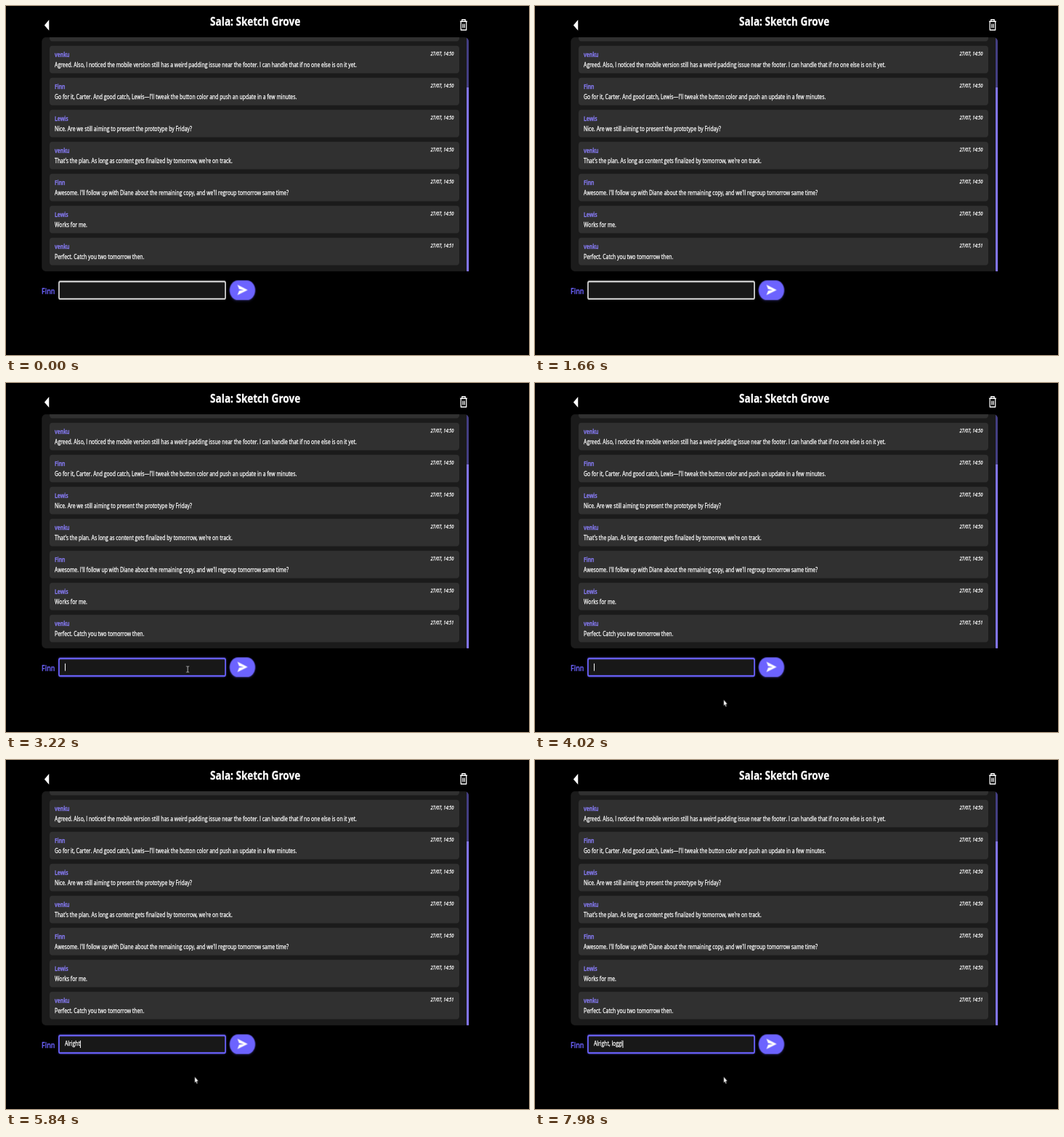
An HTML page for the animation above (8 s loop, 720x480 px).

```html
<!DOCTYPE html>
<html lang="en">
<head>
<meta charset="utf-8">
<title>Chat room</title>
<style>
  html, body { margin: 0; width: 100%; height: 100%; overflow: hidden; background: #000; }
  svg { display: block; width: 720px; height: 480px; }
  text { font: 18.25px "Open Sans", "Noto Sans", sans-serif; fill: #fff; stroke: #fff; stroke-width: .6; white-space: pre; }
  .title { font-size: 36.3px; font-weight: 700; text-anchor: middle; }
  .author { font-size: 18.4px; font-weight: 600; fill: #8b7fff; stroke: #8b7fff; }
  .time { font-size: 15.5px; font-style: italic; text-anchor: end; }
  .me { font-size: 23.4px; font-weight: 600; fill: #6c63ff; stroke: #6c63ff; }
  .card { fill: #303030; }
  .send { fill: #6c63ff; filter: drop-shadow(0 3px 4px #6c63ff40); }

  .field { fill: #181818; stroke: #d6d6d6; stroke-width: 4.6; animation: focus 8s step-end infinite; }
  @keyframes focus {
    0% { stroke: #d6d6d6; filter: none; }
    35.6%, 100% { stroke: #6c63ff; filter: drop-shadow(0 0 4px #6c63ff60); }
  }

  #pointer { animation: move 8s ease-in-out infinite; }
  @keyframes move {
    0%, 21.25% { transform: translate(800px, 1110px); }
    31% { transform: translate(685px, 904px); }
    34.4%, 43.75% { transform: translate(667px, 886px); }
    49.4%, 100% { transform: translate(693px, 980px); }
  }
  .arrow { animation: outside 8s step-end infinite; }
  .beam { animation: inside 8s step-end infinite; }
  @keyframes outside { 0% { opacity: 1; } 30% { opacity: 0; } 45.8%, 100% { opacity: 1; } }
  @keyframes inside { 0% { opacity: 0; } 30% { opacity: 1; } 45.8%, 100% { opacity: 0; } }
</style>
</head>
<body>
<svg viewBox="0 0 1920 1080" preserveAspectRatio="none">
  <clipPath id="panelClip"><rect x="131" y="97" width="1568" height="724" rx="14"/></clipPath>

  <path d="M158 43V76L141 59.5Z" fill="#fff"/>
  <text class="title" x="915" y="60.5">Sala: Sketch Grove</text>
  <path d="M1667 48H1693M1674 47V42H1686V47M1670 49V74H1690V49M1677 55V68M1683 55V68"
    fill="none" stroke="#fff" stroke-width="3.4" stroke-linejoin="round"/>

  <g clip-path="url(#panelClip)">
    <rect x="131" y="97" width="1568" height="724" fill="#1b1b1b"/>
    <g id="messages"><rect class="card" x="160" y="24" width="1504" height="85" rx="10"/></g>
    <rect x="1691" y="97" width="8" height="155" fill="#453f86"/>
  </g>
  <rect x="1691" y="252" width="8" height="569" fill="#8577f2"/>

  <text class="me" x="131" y="891">Finn</text>
  <rect class="field" x="194.5" y="852.5" width="611" height="54" rx="5"/>
  <text id="draft" x="216" y="885"></text>
  <rect id="caret" y="868" width="2.6" height="23" fill="#fff"/>

  <rect class="send" x="821" y="849" width="94" height="61" rx="30.5"/>
  <path d="M2 3L23 12L2 21L5.5 13.3L15 12L5.5 10.7Z" fill="#fff" transform="translate(846 857) scale(1.8)"/>

  <g id="pointer">
    <path class="arrow" d="M0 0V19L4.4 15L7.3 21.7L10.4 20.4L7.6 13.9H13.4Z" fill="#fff" stroke="#000" stroke-width=".6"/>
    <path class="beam" d="M-5 -9H-1.5L0 -8L1.5 -9H5M0 -8V8M-5 9H-1.5L0 8L1.5 9H5" fill="none" stroke="#ddd" stroke-width="2"/>
  </g>
</svg>
<script>
  const messages = [
    ["venku", "Agreed. Also, I noticed the mobile version still has a weird padding issue near the footer. I can handle that if no one else is on it yet."],
    ["Finn", "Go for it, Carter. And good catch, Lewis—I'll tweak the button color and push an update in a few minutes."],
    ["Lewis", "Nice. Are we still aiming to present the prototype by Friday?"],
    ["venku", "That's the plan. As long as content gets finalized by tomorrow, we're on track."],
    ["Finn", "Awesome. I'll follow up with Diane about the remaining copy, and we'll regroup tomorrow same time?"],
    ["Lewis", "Works for me."],
    ["venku", "Perfect. Catch you two tomorrow then.", "27/07, 14:51"]
  ];
  const byId = id => document.getElementById(id);

  function add(tag, attrs, content = "") {
    const node = document.createElementNS("http://www.w3.org/2000/svg", tag);
    for (const name in attrs) node.setAttribute(name, attrs[name]);
    node.textContent = content;
    byId("messages").append(node);
  }

  messages.forEach(([author, body, time = "27/07, 14:50"], i) => {
    const y = 123 + i * 99;
    add("rect", { class: "card", x: 160, y, width: 1504, height: 85, rx: 10 });
    add("text", { class: "author", x: 179, y: y + 35 }, author);
    add("text", { x: 179, y: y + 65 }, body);
    add("text", { class: "time", x: 1644, y: y + 31 }, time);
  });

  const LOOP = 8000, FOCUS = 2850, BLINK = 500;
  const phrase = "Alright, loggi";
  const keyTimes = [4540, 4720, 4960, 5160, 5340, 5540, 5720, 6060, 6260, 6700, 6960, 7260, 7540, 7840];
  const draft = byId("draft"), caret = byId("caret");
  const clock = byId("pointer").getAnimations()[0];

  function render() {
    const t = (clock.currentTime || 0) % LOOP;
    const typed = keyTimes.filter(key => key <= t).length;
    const lastEdit = typed ? keyTimes[typed - 1] : FOCUS;
    const text = phrase.slice(0, typed);
    if (draft.textContent !== text) draft.textContent = text;
    caret.setAttribute("x", 216 + (typed ? draft.getComputedTextLength() : 0));
    const lit = t >= FOCUS && Math.floor((t - lastEdit) / BLINK) % 2 === 0;
    caret.setAttribute("opacity", lit ? 1 : 0);
    requestAnimationFrame(render);
  }
  render();
</script>
</body>
</html>
```
